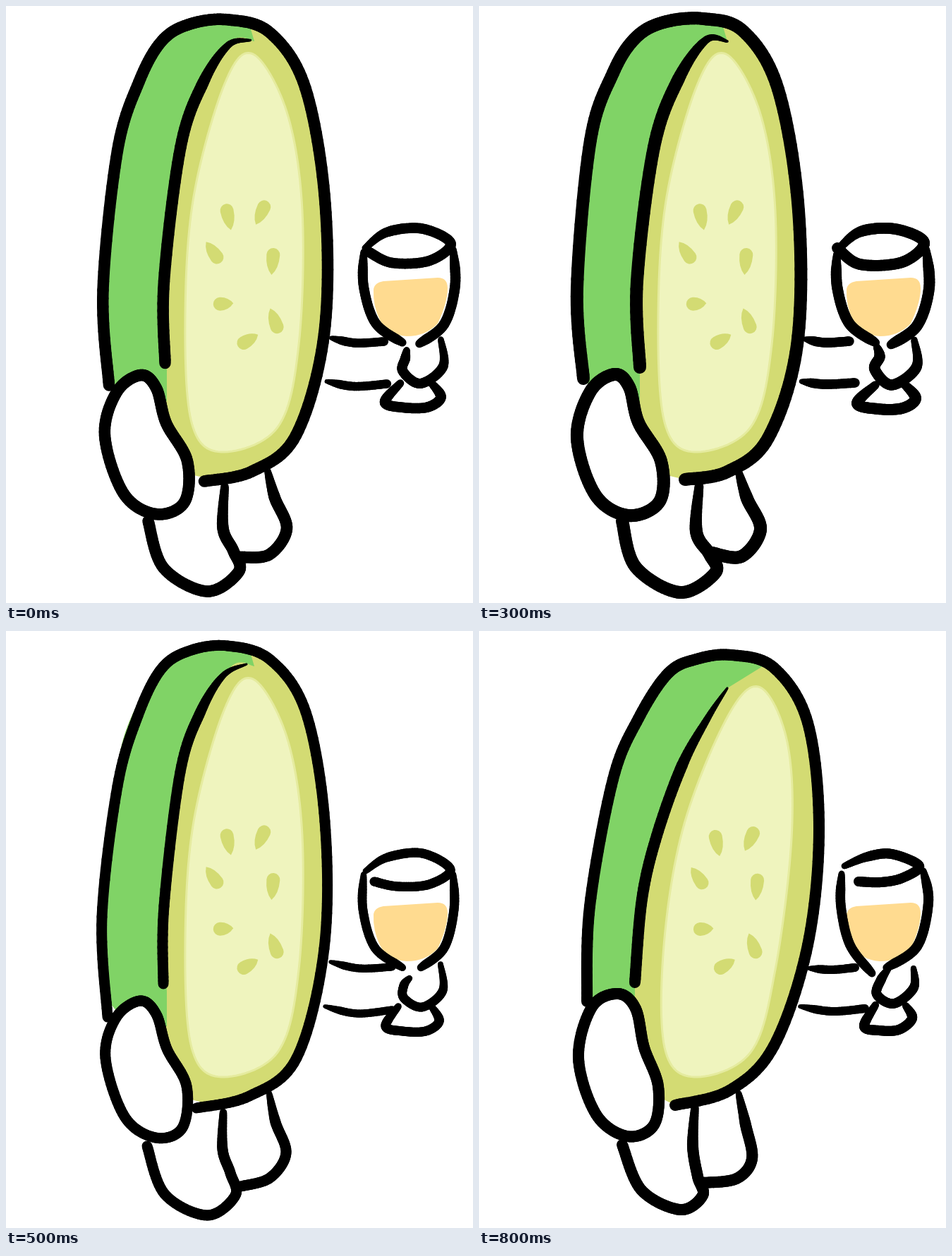
Write an HTML page with a canvas that moves like this. It is 662 px wide and 846 px high and loops after 900 ms.

```html
<!DOCTYPE html>
<html lang="en">
<head>
<meta charset="utf-8">
<title>Cheers</title>
<style>
  html, body { margin: 0; width: 100%; height: 100%; overflow: hidden; background: #fff; }
  canvas { position: absolute; left: 0; top: 0; opacity: 0; }
</style>
</head>
<body>
<script>
const WIDTH = 662, HEIGHT = 846, STEP = 100;
const SEQUENCE = ['bold', 'between', 'thin', 'bold', 'between', 'thin', 'lean', 'leanLoose', 'lean'];
const COLORS = { green: '#80d366', rim: '#d3db73', flesh: '#eff4be', edge: '#e5eb9f', drink: '#ffdb90' };
const WEIGHT = { bold: 18, thin: 15, lean: 16 };

// Every pose is a blend of two drawings
const POSES = {
  bold: { from: 'bold', to: 'bold', amount: 0 },
  between: { from: 'bold', to: 'thin', amount: .5 },
  thin: { from: 'thin', to: 'thin', amount: 0 },
  lean: { from: 'lean', to: 'lean', amount: 0, leaning: true },
  leanLoose: { from: 'lean', to: 'bold', amount: .1, leaning: true }
};

// Key points of each ink line; start and end are the brush pressure at the tips
const INK = {
  frontLeg: {
    bold: '203 730 222 795 285 831 335 803 327 777 308 745 312 680',
    thin: '200 730 225 798 285 828 325 800 318 768 307 735 308 682',
    lean: '203 728 230 792 285 820 317 800 310 773 303 730 306 675', end: .7
  },
  backLeg: {
    bold: '368 660 380 698 399 742 372 780 330 775',
    thin: '373 655 382 696 397 740 374 775 333 787',
    lean: '368 655 378 700 387 748 365 776 318 782', start: .5
  },
  outline: {
    bold: '148 528 139 400 158 190 190 95 222 45 262 23 318 18 375 36 424 118 453 290 451 480 410 612 352 660 292 671',
    thin: '144 547 136 405 158 220 187 120 220 54 260 28 314 21 375 41 425 115 452 270 451 450 412 605 345 659 270 676',
    lean: '153 525 157 390 190 210 226 124 268 60 308 40 358 34 418 52 466 130 482 280 466 445 418 588 355 651 278 672'
  },
  ridge: {
    bold: '228 512 224 390 248 200 283 103 322 48 352 50',
    thin: '223 500 224 390 247 200 276 114 308 63 341 47',
    lean: '221 498 231 380 252 290 288 190 325 122 352 81', end: .2
  },
  leftHand: {
    bold: '158 546 192 522 213 540 226 590 258 645 256 702 212 722 165 693 139 612',
    thin: '156 548 190 524 213 543 228 592 256 645 250 704 212 718 168 688 141 605',
    lean: '160 533 197 514 222 535 234 590 254 645 248 700 210 716 166 685 141 605', closed: true
  },
  armTop: {
    bold: '462 472 490 477 525 475', thin: '460 469 500 478 547 476', lean: '468 478 500 480 533 477',
    start: .4, size: .75
  },
  armBottom: {
    bold: '457 532 490 536 533 534', thin: '452 532 497 542 547 537', lean: '455 532 500 539 547 535',
    start: .4, size: .75
  },
  bowlLeft: {
    bold: '507 352 508 400 525 450 562 477',
    thin: '507 345 506 395 523 449 562 477',
    lean: '514 344 513 390 526 445 557 485', start: .6, end: .8, size: .85
  },
  bowlRight: {
    bold: '634 345 638 400 621 453 584 480',
    thin: '634 345 635 395 621 449 588 477',
    lean: '630 340 637 385 621 447 578 477', start: .6, end: .8, size: .88
  },
  glassRim: {
    bold: '508 346 540 320 590 316 631 335 600 363 540 366 508 343',
    thin: '510 340 540 321 590 315 630 338 600 359 555 362 522 355',
    lean: '518 333 550 320 585 316 624 333 600 350 570 356 538 355', start: .6, size: .88
  },
  fingers: {
    bold: '564 483 568 497 561 515 585 537 620 512 617 473',
    thin: '572 492 564 502 564 520 590 533 619 510 616 472',
    lean: '580 479 570 494 564 515 588 528 616 506 616 478', start: .6, end: .6, size: .85
  },
  base: {
    bold: '562 537 536 563 565 571 600 570 619 556 602 535',
    thin: '556 532 538 560 562 567 595 567 614 553 604 533',
    lean: '562 530 546 560 567 566 595 565 614 549 605 531', start: .7, end: .7, size: .88
  }
};

const FLESH = '350 68 398 150 420 290 415 480 385 597 305 632 263 590 254 440 266 270 310 110';
const DRINK = 'M521 402Q522 392 535 390L612 385Q626 385 626 400Q626 420 612 450Q595 468 568 468Q540 466 530 445Q520 425 521 402Z';
// x, y and the direction of the pointed end in degrees
const SEEDS = [[315, 299, 78], [362, 293, 115], [294, 349, 235], [378, 362, 95], [308, 422, -3], [381, 446, -110], [343, 474, -30]];

const lerp = (a, b, t) => a + (b - a) * t;

function toPoints(text) {
  const values = text.split(' ').map(Number);
  return values.flatMap((x, i) => i % 2 ? [] : [[x, values[i + 1]]]);
}

function blend(part, { from, to, amount }) {
  const target = toPoints(part[to]);
  return toPoints(part[from]).map((p, i) => p.map((v, axis) => lerp(v, target[i][axis], amount)));
}

// Catmull-Rom curve
function smooth(points, closed, detail = 14) {
  const n = points.length, out = [];
  const at = i => points[closed ? (i + n) % n : Math.max(0, Math.min(n - 1, i))];
  for (let i = 0; i < (closed ? n : n - 1); i++) {
    const [a, b, c, d] = [-1, 0, 1, 2].map(k => at(i + k));
    for (let s = 0; s < detail; s++) {
      const t = s / detail;
      out.push([0, 1].map(k => .5 * (2 * b[k] + (c[k] - a[k]) * t
        + (2 * a[k] - 5 * b[k] + 4 * c[k] - d[k]) * t * t
        + (3 * b[k] - a[k] - 3 * c[k] + d[k]) * t ** 3)));
    }
  }
  return [...out, closed ? points[0] : points[n - 1]];
}

// The body bends to the right, more strongly towards its top
function leanPoint([x, y]) {
  const rise = Math.max(0, 540 - y);
  return [x + .08 * rise + .00005 * rise ** 2, y + 12 * (rise / 472) ** 3];
}

function trace(ctx, points) {
  ctx.beginPath();
  points.forEach(p => ctx.lineTo(...p));
  ctx.closePath();
}

function fillShape(ctx, points, color) {
  trace(ctx, points);
  ctx.fillStyle = color;
  ctx.fill();
}

function drawInk(ctx, part, pose) {
  const { start = 1, end = 1, size = 1, closed } = part;
  const curve = smooth(blend(part, pose), closed);
  const weight = size * lerp(WEIGHT[pose.from], WEIGHT[pose.to], pose.amount);
  if (closed) fillShape(ctx, curve, '#fff');
  for (let i = 1; i < curve.length; i++) {
    const t = i / (curve.length - 1);
    ctx.lineWidth = weight * Math.min(1, start + 2 * t, end + 2 * (1 - t));
    ctx.beginPath();
    ctx.moveTo(...curve[i - 1]);
    ctx.lineTo(...curve[i]);
    ctx.stroke();
  }
}

function drawSeed(ctx, [x, y], degrees) {
  const angle = degrees * Math.PI / 180, r = 9.5;
  const half = 14 + 5 * Math.abs(Math.sin(angle));
  ctx.save();
  ctx.translate(x, y);
  ctx.rotate(angle);
  ctx.beginPath();
  ctx.arc(r - half, 0, r, Math.PI / 2, -Math.PI / 2);
  ctx.quadraticCurveTo(half * .5, -r, half, 0);
  ctx.quadraticCurveTo(half * .5, r, r - half, r);
  ctx.fill();
  ctx.restore();
}

function drawBody(ctx, leaning) {
  const key = leaning ? 'lean' : 'bold';
  const bend = leaning ? leanPoint : p => p;
  const ridge = smooth(toPoints(INK.ridge[key]));
  const crown = leaning ? [415, 42] : [345, 26];

  ctx.save();
  const body = [...smooth(toPoints(INK.outline[key])), [262, 664]];
  fillShape(ctx, body, COLORS.rim);
  trace(ctx, body);
  ctx.clip();
  fillShape(ctx, [[0, 560], [ridge[0][0], 560], ...ridge, crown, [crown[0], 0], [0, 0]], COLORS.green);
  ctx.restore();

  const flesh = smooth(toPoints(FLESH).map(bend), true);
  fillShape(ctx, flesh, COLORS.flesh);
  ctx.save();
  ctx.strokeStyle = COLORS.edge;
  ctx.lineWidth = 3;
  ctx.stroke();
  ctx.restore();

  ctx.fillStyle = COLORS.rim;
  for (const [x, y, angle] of SEEDS) drawSeed(ctx, bend([x, y]), angle);
}

function drawPose(pose) {
  const canvas = document.createElement('canvas');
  canvas.width = WIDTH;
  canvas.height = HEIGHT;
  const ctx = canvas.getContext('2d');
  ctx.lineCap = ctx.lineJoin = 'round';
  ctx.fillStyle = '#fff';
  ctx.fillRect(0, 0, WIDTH, HEIGHT);
  ctx.fillStyle = COLORS.drink;
  ctx.fill(new Path2D(DRINK));
  for (const [name, part] of Object.entries(INK)) {
    if (name === 'outline') drawBody(ctx, pose.leaning);
    drawInk(ctx, part, pose);
  }
  document.body.append(canvas);
  return canvas;
}

for (const [name, pose] of Object.entries(POSES)) {
  const frames = [...SEQUENCE, SEQUENCE[0]].map((shown, i) => ({
    opacity: shown === name ? 1 : 0,
    offset: i / SEQUENCE.length,
    easing: 'steps(1, end)'
  }));
  const clip = drawPose(pose).animate(frames, { duration: STEP * SEQUENCE.length, iterations: Infinity });
  clip.startTime = document.timeline.currentTime;
}
</script>
</body>
</html>
```
